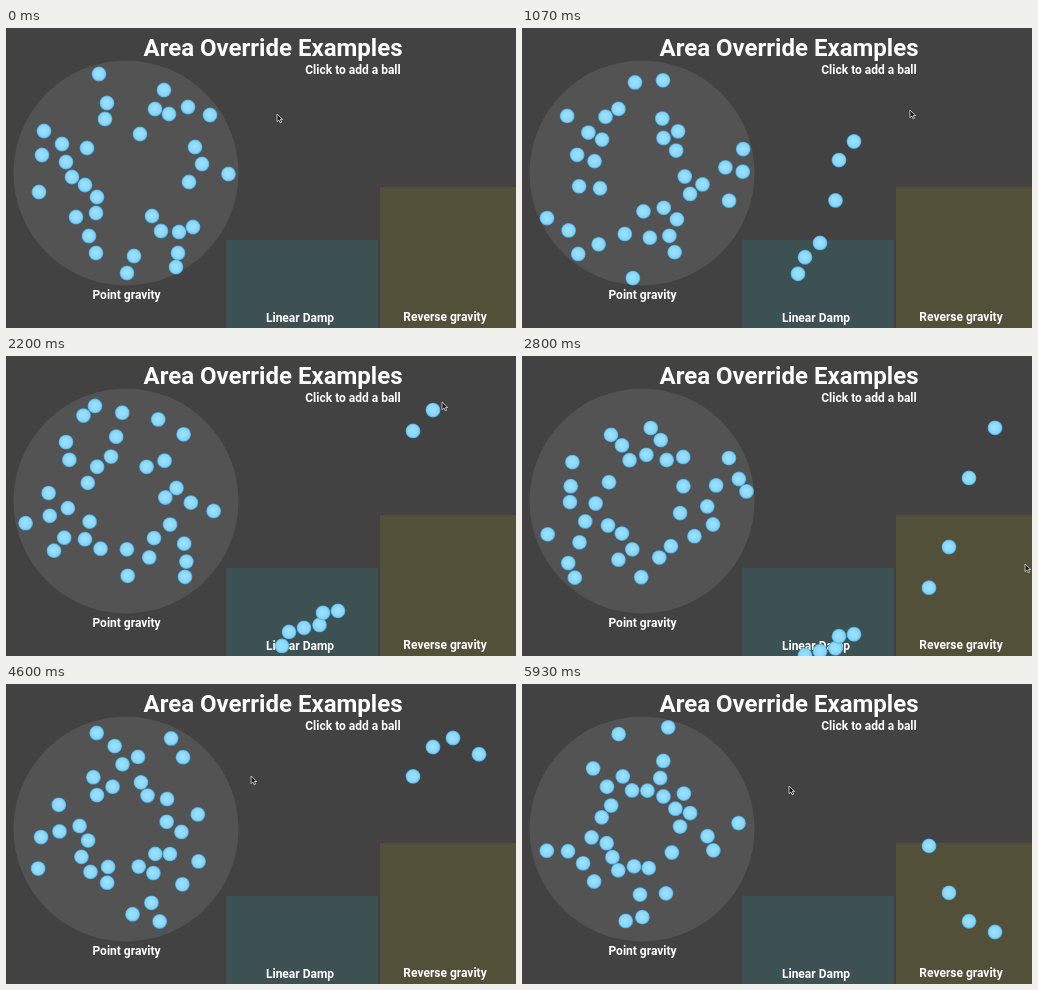
An HTML page with a canvas that plays this animation: 510 by 300 pixels, repeating every 6 s.

```html
<!DOCTYPE html>
<html lang="en">
<head>
<meta charset="utf-8">
<title>Area Override Examples</title>
<style>
  html, body { margin: 0; width: 100%; height: 100%; overflow: hidden; background: #424242; }
  canvas { display: block; width: 510px; height: 300px; }
</style>
</head>
<body>
<canvas id="stage" width="510" height="300"></canvas>
<script>
const ctx = document.getElementById('stage').getContext('2d');
const LOOP = 6000, FPS = 15, FRAMES = 90;
const G = 610, R = 7.2;
const WELL = { x: 120, y: 145, r: 112.5 };

// Balls orbiting in the point gravity area: x, y pairs.
const START = [
  93,46, 158,62, 101,75, 99,91, 149,81, 163,86, 182,79, 204,87, 134,106,
  38,103, 56,116, 81,120, 36,127, 60,134, 66,149, 79,157, 91,169, 90,185,
  70,189, 33,164, 83,208, 90,225, 121,245, 128,228, 146,188, 155,203,
  173,204, 187,199, 172,225, 170,239, 189,119, 196,136, 183,154, 222.5,146
];

// Dropped balls: x, y, time of the click in seconds.
const DAMPED = [
  [276, 110, .01], [283, 110, .37], [298, 110, .475],
  [313.5, 91, .55], [317, 119, .86], [332, 106, .91]
];
const FLOATING = [
  [407, 50, 1.914], [427, 51, 2.1], [447, 54, 2.328], [473, 56, 2.572]
];

// Pointer: time, x, y.
const POINTER = [
  [0, 271, 86], [.07, 276, 108], [.37, 283, 110], [.475, 298, 110],
  [.55, 313, 92], [.7, 316, 112], [.86, 317, 119], [.91, 331, 106],
  [1.067, 388, 82], [1.4, 405, 55], [1.914, 407, 50], [2.1, 427, 51],
  [2.2, 436, 46], [2.328, 447, 54], [2.572, 473, 56], [2.67, 486, 90],
  [2.8, 503, 208], [2.9, 514, 250],
  [4.4, 514, 250], [4.401, 243, 94], [4.6, 245, 92], [5.2, 262, 98], [5.93, 267, 102]
];

const LABELS = [
  ['Area Override Examples', 267, 28, 24],
  ['Click to add a ball', 347, 46, 12],
  ['Point gravity', 120.5, 271, 12],
  ['Linear Damp', 294, 294, 12],
  ['Reverse gravity', 439, 293, 12]
];

function random(seed) {
  return () => (seed = (seed * 16807) % 2147483647) / 2147483647;
}

function launch() {
  const rnd = random(77), balls = [];
  for (let i = 0; i < START.length; i += 2) {
    const x = START[i] - WELL.x, y = START[i + 1] - WELL.y;
    const r = Math.hypot(x, y);
    const spin = 11600 * (.88 + .16 * rnd()) / r;
    const energy = 69600 - G * r;
    const radial = Math.sqrt(Math.max(0, 2 * energy - spin * spin)) * (rnd() < .5 ? -1 : 1);
    balls.push({ x, y, vx: (x * radial - y * spin) / r, vy: (y * radial + x * spin) / r });
  }
  return balls;
}

function push(b, nx, ny, speed, gap) {
  b.vx += nx * speed;
  b.vy += ny * speed;
  b.x += nx * gap;
  b.y += ny * gap;
}

function collide(a, b) {
  const dx = b.x - a.x, dy = b.y - a.y, d = Math.hypot(dx, dy);
  if (d >= 2 * R || d === 0) return;
  const nx = dx / d, ny = dy / d, gap = (2 * R - d) / 2;
  const closing = Math.max(0, (a.vx - b.vx) * nx + (a.vy - b.vy) * ny) * .95;
  push(a, nx, ny, -closing, -gap);
  push(b, nx, ny, closing, gap);
}

function confine(b) {
  const r = Math.hypot(b.x, b.y), edge = Math.min(106, Math.max(38, r));
  if (r === edge) return;
  const nx = b.x / r, ny = b.y / r, out = b.vx * nx + b.vy * ny;
  push(b, nx, ny, out * (r - edge) > 0 ? -2 * out : 0, edge - r);
}

function simulate() {
  const balls = launch(), track = [], sub = 20, dt = 1 / (FPS * sub);
  for (let f = 0; f < FRAMES; f++) {
    track.push(balls.map(b => [b.x + WELL.x, b.y + WELL.y]));
    for (let s = 0; s < sub; s++) {
      for (const b of balls) {
        const pull = G * dt / Math.hypot(b.x, b.y);
        b.vx -= b.x * pull;
        b.vy -= b.y * pull;
        b.x += b.vx * dt;
        b.y += b.vy * dt;
      }
      balls.forEach((a, i) => {
        for (let j = i + 1; j < balls.length; j++) collide(a, balls[j]);
      });
      balls.forEach(confine);
    }
  }
  return track;
}

// Free fall, then exponential approach to terminal speed.
function dampedY(y0, t) {
  const top = 207, damp = 15.6, terminal = 39;
  const fall = Math.sqrt(2 * (top - y0) / G);
  if (t < fall) return y0 + G * t * t / 2;
  const s = t - fall;
  return top + terminal * s + (G * fall - terminal) * (1 - Math.exp(-damp * s)) / damp;
}

// Gravity flips at the area's border, so the path is a chain of parabolas.
function floatingY(y0, t) {
  const border = 152, q = Math.sqrt(2 * (border - y0) / G);
  const p = t % (4 * q), sag = u => G * u * u / 2;
  if (p < q) return y0 + sag(p);
  if (p < 3 * q) return 2 * border - y0 - sag(p - 2 * q);
  return y0 + sag(p - 4 * q);
}

function pointerAt(t) {
  const i = POINTER.findIndex(p => p[0] > t);
  if (i < 0) return POINTER[POINTER.length - 1].slice(1);
  const [t0, x0, y0] = POINTER[i - 1], [t1, x1, y1] = POINTER[i];
  const k = (t - t0) / (t1 - t0);
  return [x0 + (x1 - x0) * k, y0 + (y1 - y0) * k];
}

function drawScene() {
  ctx.fillStyle = '#424242';
  ctx.fillRect(0, 0, 510, 300);
  ctx.fillStyle = '#535353';
  ctx.beginPath();
  ctx.arc(WELL.x, WELL.y, WELL.r, 0, 7);
  ctx.fill();
  ctx.fillStyle = '#3d5152';
  ctx.fillRect(220, 212, 152, 88);
  ctx.fillStyle = '#525039';
  ctx.fillRect(374, 159, 136, 141);
  ctx.fillStyle = '#fff';
  ctx.textAlign = 'center';
  for (const [text, x, y, size] of LABELS) {
    ctx.font = `bold ${size}px Roboto, sans-serif`;
    ctx.fillText(text, x, y);
  }
}

const skin = ctx.createRadialGradient(-.5, -.5, 0, 0, 0, 7.4);
skin.addColorStop(0, '#a2e2ff');
skin.addColorStop(.5, '#90dbff');
skin.addColorStop(.8, '#84d4fb');
skin.addColorStop(1, '#45a5da');

function drawBall(x, y) {
  ctx.save();
  ctx.translate(x, y);
  ctx.fillStyle = skin;
  ctx.beginPath();
  ctx.arc(0, 0, 7.4, 0, 7);
  ctx.fill();
  ctx.restore();
}

const ARROW = new Path2D('M0 0V7.6L1.9 6L3.2 8.8L4.6 8.2L3.4 5.5H5.8Z');

function drawPointer(x, y) {
  ctx.save();
  ctx.translate(x, y);
  ctx.fillStyle = '#1c1c1c';
  ctx.strokeStyle = '#d8d8d8';
  ctx.lineWidth = .8;
  ctx.fill(ARROW);
  ctx.stroke(ARROW);
  ctx.restore();
}

const track = simulate();

function drawDrops(drops, height, t) {
  for (const [x, y, start] of drops) {
    if (t >= start) drawBall(x, height(y, t - start));
  }
}

function render(ms) {
  const f = Math.floor((ms % LOOP + 3.4) * FPS / 1000) % FRAMES;
  const t = f / FPS;
  drawScene();
  track[f].forEach(([x, y]) => drawBall(x, y));
  drawDrops(DAMPED, dampedY, t);
  drawDrops(FLOATING, floatingY, t);
  drawPointer(...pointerAt(t));
}

const begin = performance.now();
function tick() {
  render(performance.now() - begin);
  requestAnimationFrame(tick);
}
tick();
</script>
</body>
</html>
```
